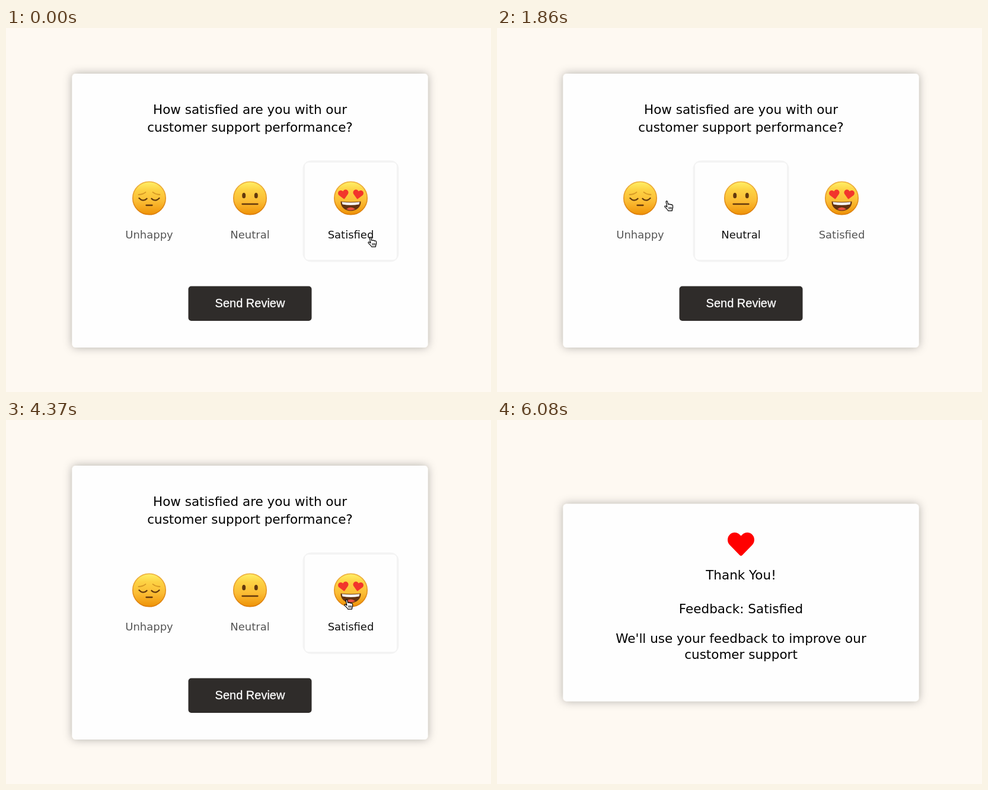
Animation of 818x614 px, one loop 6680 ms. Source, as an HTML page:

```html
<!DOCTYPE html>
<html lang="en">
<head>
<meta charset="utf-8">
<title>Feedback form</title>
<style>
  html, body { margin: 0; width: 100%; height: 100%; overflow: hidden; background: #fef9f2; }
  svg { display: block; width: 100%; height: 100%; }
  text { font-family: "DejaVu Sans", sans-serif; text-anchor: middle; }
  .title { font-size: 21.5px; }
  .label { font-size: 18px; fill: #555; }
  .on .label { fill: #111; }
  .frame { visibility: hidden; }
  .on .frame { visibility: visible; }
  .button text { font: 20px "Liberation Sans", Arial, sans-serif; fill: #fff; stroke: #fff; stroke-width: .3; }
  .panel { fill: #fefefe; filter: url(#shadow); }
  .ink { fill: none; stroke: #63390d; stroke-width: 2.3; stroke-linecap: round; }
  .brow { stroke: #d79a25; stroke-width: 1.8; }
</style>
</head>
<body>
<svg viewBox="0 0 818 614">
  <defs>
    <filter id="shadow" x="-10%" y="-10%" width="120%" height="120%">
      <feDropShadow dx="0" dy="0" stdDeviation="7.5" flood-opacity=".3"/>
    </filter>
    <linearGradient id="skin" x2="0" y2="1">
      <stop offset="0" stop-color="#fff066"/>
      <stop offset=".25" stop-color="#fdd244"/>
      <stop offset=".6" stop-color="#fbbc34"/>
      <stop offset="1" stop-color="#ee9206"/>
    </linearGradient>
    <linearGradient id="rim" x2="0" y2="1">
      <stop offset="0" stop-color="#efb444"/>
      <stop offset="1" stop-color="#dd7d08"/>
    </linearGradient>
    <path id="heart" d="M0 6.5L-1.7 4.7C-6.2 .2-13.3-.6-18.1 3.5C-23.6 8.2-23.9 16.7-19 21.8L-2 39.3C-.9 40.4 .9 40.4 2 39.3L19 21.8C23.9 16.7 23.6 8.2 18.1 3.5C13.3-.6 6.2 .2 1.7 4.7Z"/>
    <circle id="face" r="27.7" fill="url(#skin)" stroke="url(#rim)" stroke-width="1.7"/>
    <g id="Unhappy">
      <path class="ink" d="M-17 0Q-10.5 7-4 .8M17 0Q10.5 7 4 .8M-5 12H5"/>
      <path class="ink brow" d="M-18-6Q-11-6-6-10M18-6Q11-6 6-10"/>
    </g>
    <g id="Neutral" fill="#63390d">
      <ellipse cx="-10.3" cy="-4.3" rx="3" ry="4.6"/>
      <ellipse cx="10.3" cy="-4.3" rx="3" ry="4.6"/>
      <path class="ink" d="M-13 10H13"/>
    </g>
    <g id="Satisfied">
      <g fill="#f2352c">
        <use href="#heart" transform="translate(-13.5 -14) rotate(-9) scale(.39)"/>
        <use href="#heart" transform="translate(13.5 -14) rotate(9) scale(.39)"/>
      </g>
      <path d="M-17 5.5Q0 7.5 17 5.5C17.5 15 9.5 21.5 0 21.5S-17.5 15-17 5.5Z" fill="#633211"/>
      <path d="M-15 6.6Q0 8.4 15 6.6L14 10.5Q0 13-14 10.5Z" fill="#fff"/>
      <path d="M-7.5 18.5Q0 12.5 7.5 18.5Q0 22.5-7.5 18.5Z" fill="#ec5240"/>
    </g>
  </defs>

  <g id="form">
    <rect class="panel" x="111.5" y="77" width="600" height="462" rx="6"/>
    <text class="title" x="411.5" y="144.8">How satisfied are you with our</text>
    <text class="title" x="411.5" y="174.8">customer support performance?</text>
    <g id="cards"></g>
    <path id="bridge" fill="#f3f3f3" d="M489.5 232Q496.5 244 504 232V386Q496.5 374 489.5 386Z"/>
    <g id="button" class="button">
      <rect x="-104" y="-29.2" width="208" height="58.4" rx="5" fill="#2f2c2a"/>
      <text y="6.7">Send Review</text>
    </g>
  </g>
  <g id="thanks">
    <rect class="panel" x="111.5" y="141.5" width="600" height="333" rx="6"/>
    <use href="#heart" x="411.5" y="189" fill="#f00"/>
    <text class="title" x="411.5" y="269">Thank You!</text>
    <text class="title" x="411.5" y="325.6">Feedback: Satisfied</text>
    <text class="title" x="411.5" y="376">We'll use your feedback to improve our</text>
    <text class="title" x="411.5" y="402.6">customer support</text>
  </g>
  <g id="cursor" stroke-linejoin="round">
    <g id="hand" fill="#fff" stroke="#000" stroke-width="1.2" stroke-linecap="round">
      <path d="M3.2 2.2C2.9 .7 5 .3 5.5 1.8L6.8 6.5C7.2 5.4 9 5.6 9.2 6.7C9.8 5.8 11.5 6.1 11.7 7.3C12.4 6.5 14.3 7 14.5 8.4C14.9 10.6 14.8 12.4 13.8 14.4L13.3 17.2H6.6C6 15 3 12.8 1.2 10.8C.3 9.4 1.8 8.4 3 9.3L4.9 10.9Z"/>
      <path d="M8 11.2V14.2M10.1 11.2V14.2M12.1 11.2V14.2" stroke-width="1"/>
    </g>
    <path id="arrow" d="M3.6 .8V15L7 11.9L9.2 17L11.6 16L9.4 11H14Z" stroke="#fff" stroke-width="1.2"/>
  </g>
</svg>
<script>
const LOOP = 6680, STEP = 90, PRESS = 5180, SENT = 5270;
const names = ['Unhappy', 'Neutral', 'Satisfied'];
const home = { x: 610, y: 352 };

// Pointer trips; a trip to a card ends with a click that selects it.
const trips = [
  { start: 710, end: 1150, x: 410, y: 298, card: 'Neutral', click: 1330 },
  { start: 1690, end: 2130, x: 225, y: 288, card: 'Unhappy', click: 2400 },
  { start: 2670, end: 2930, x: 379, y: 296, card: 'Neutral', click: 3380 },
  { start: 3650, end: 3920, x: 570, y: 302, card: 'Satisfied', click: 4370 },
  { start: 4640, end: 5000, x: 453, y: 463 },
  { start: 5900, end: 6080, x: 783, y: 621 }
];

const byId = id => document.getElementById(id);
const show = (node, visible) => { node.style.display = visible ? '' : 'none'; };
const easeOut = p => 1 - (1 - p) ** 1.7;

byId('cards').innerHTML = names.map((name, i) => `
  <g transform="translate(${241.5 + 170 * i} 287)">
    <g class="frame">
      <rect x="-81" y="-63.5" width="162" height="171" rx="14" fill="#f3f3f3"/>
      <rect x="-77.5" y="-60" width="155" height="164" rx="6" fill="#fefefe"/>
    </g>
    <use href="#face"/><use href="#${name}"/>
    <text class="label" y="68">${name}</text>
  </g>`).join('');

// The pointer advances in discrete steps, so progress does too.
function progress({ start, end }, time) {
  if (time < start) return 0;
  const count = Math.round((end - start) / STEP) + 1;
  const done = Math.floor((time - start + 10) / STEP) + 1;
  return easeOut(Math.min(done / count, 1));
}

function pointerAt(time) {
  return trips.reduce((pos, trip) => {
    const p = progress(trip, time);
    return { x: pos.x + (trip.x - pos.x) * p, y: pos.y + (trip.y - pos.y) * p };
  }, home);
}

function litCards(time) {
  let selected = 'Satisfied', hovered;
  for (const { end, card, click } of trips) {
    if (card && time >= end - STEP) hovered = card;
    if (time >= click) selected = card;
  }
  return [selected, hovered];
}

function draw(time) {
  const lit = litCards(time);
  names.forEach((name, i) =>
    byId('cards').children[i].setAttribute('class', lit.includes(name) ? 'on' : ''));
  show(byId('bridge'), lit.includes('Neutral') && lit.includes('Satisfied'));

  const sent = time >= SENT;
  show(byId('form'), !sent);
  show(byId('thanks'), sent);
  show(byId('hand'), !sent);
  show(byId('arrow'), sent);
  byId('button').setAttribute('transform',
    `translate(411.5 464.7) scale(${time >= PRESS ? .98 : 1})`);

  const { x, y } = pointerAt(time);
  byId('cursor').setAttribute('transform', `translate(${x} ${y})`);
}

const begin = performance.now();
function tick() {
  draw((performance.now() - begin) % LOOP);
  requestAnimationFrame(tick);
}
tick();
</script>
</body>
</html>
```
